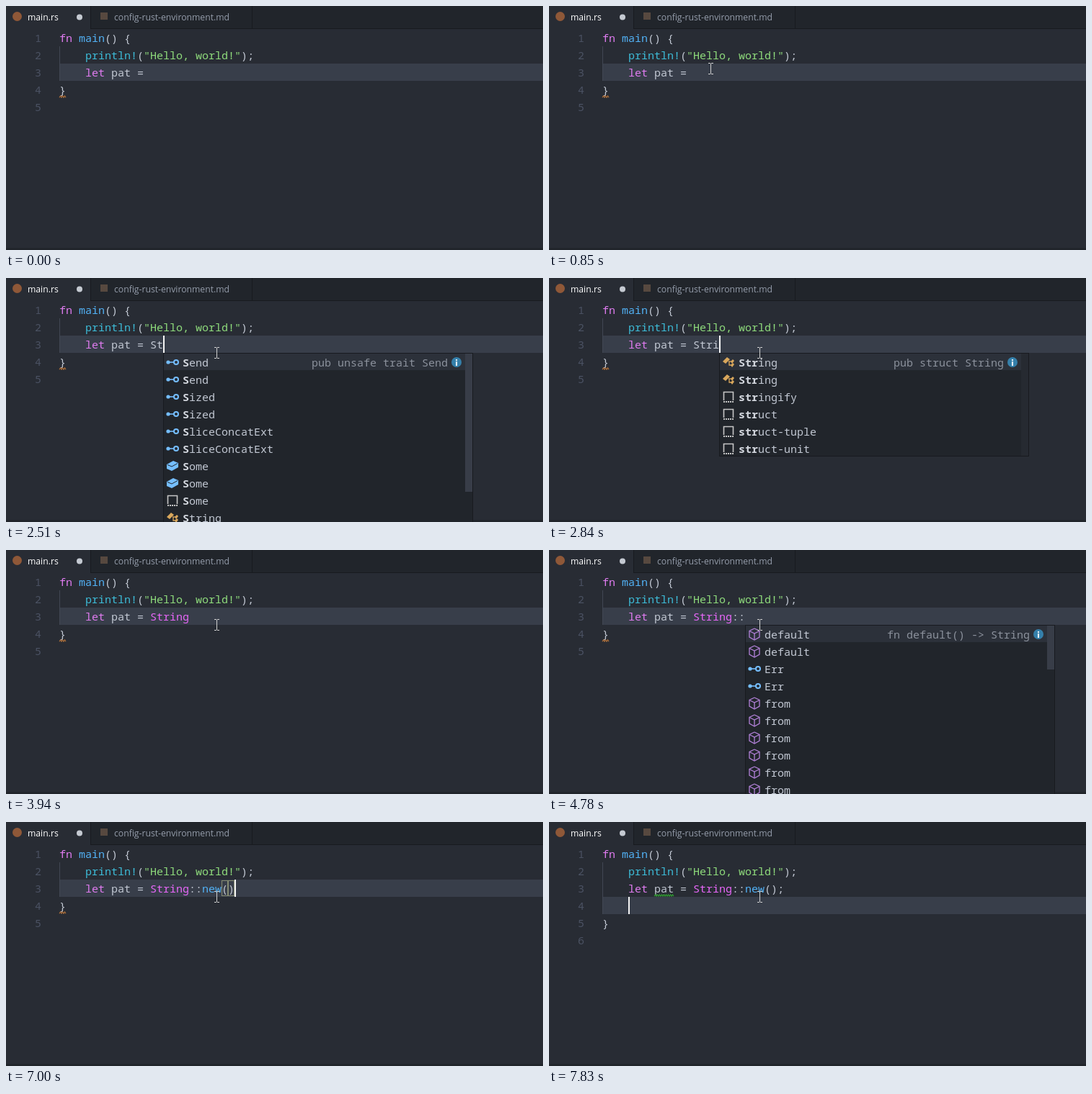
Animation, 745 px wide and 339 px high, one loop 8 s. Source, as an HTML page with a canvas:

```html
<!DOCTYPE html>
<html>
<head>
<meta charset="utf-8">
<style>
html, body { margin: 0; width: 100%; height: 100%; overflow: hidden; background: #282c34; }
canvas { display: block; }
</style>
</head>
<body>
<canvas id="stage" width="745" height="339"></canvas>
<script>
const ctx = document.getElementById('stage').getContext('2d', { alpha: false });
const LOOP = 8000, BLINK = 460, CHAR = 9, ROW = 24, CODE_X = 74, TYPE_X = 200;
const FAMILY = '15px "Noto Sans Mono", monospace';
const MONO = '500 ' + FAMILY, BOLD = '700 ' + FAMILY;
const C = {
  bg: '#282c34', panel: '#21252b', edge: '#181a1f', line: '#383e4a', number: '#4b5263',
  text: '#c2c8d3', keyword: '#e07cf0', func: '#52b2f6', macro: '#3dbcd8', string: '#8fdc7c',
  type: '#e767f8', detail: '#8b919c', blue: '#75beff', orange: '#d9a75c', purple: '#b180d7', grey: '#c5c5c5',
  thumb: '#383d48', faintThumb: '#262a31'
};

// Completion lists: each entry is "icon label".
const entries = list => list.split(',').map(entry => entry.split(' '));
const lists = {
  s: { detail: 'pub unsafe trait Send', thumb: 192, items: entries('trait Send,trait Send,trait Sized,trait Sized,trait SliceConcatExt,trait SliceConcatExt,variant Some,variant Some,snippet Some,struct String') },
  st: { detail: 'pub struct String', thumb: 192, items: entries('struct String,struct String,snippet static,snippet stringify,snippet struct,snippet struct-tuple,snippet struct-unit,trait SliceConcatExt,trait SliceConcatExt,snippet assert') },
  str: { detail: 'pub struct String', thumb: 142, fading: true, items: entries('struct String,struct String,snippet stringify,snippet struct,snippet struct-tuple,snippet struct-unit') },
  stri: { detail: 'pub struct String', items: entries('struct String,struct String,snippet stringify,snippet struct-unit') },
  '': { detail: 'fn default() -> String', thumb: 61, items: entries('fn default,fn default,trait Err,trait Err,fn from,fn from,fn from,fn from,fn from,fn from') },
  n: { detail: 'fn new() -> String', items: entries('fn new,fn new') }
};

// t: start, typed: text after "let pat = ", menu: list key, blink: when the caret last turned on
const steps = [
  { t: 0, typed: '', blink: 390 },
  { t: 1770, typed: 'S' },
  { t: 1820, typed: 'S', menu: 's', opens: true, blink: 1770 },
  { t: 2510, typed: 'St', menu: 's' },
  { t: 2560, typed: 'St', menu: 'st' },
  { t: 2690, typed: 'Str', menu: 'st' },
  { t: 2740, typed: 'Str', menu: 'str' },
  { t: 2840, typed: 'Stri', menu: 'str' },
  { t: 2870, typed: 'Stri', menu: 'stri', blink: 2840 },
  { t: 3480, typed: 'String' },
  { t: 4170, typed: 'String:' },
  { t: 4320, typed: 'String::' },
  { t: 4500, typed: 'String::', menu: '', opens: true, blink: 4320 },
  { t: 5190, typed: 'String::n', menu: '' },
  { t: 5240, typed: 'String::n', menu: 'n' },
  { t: 5830, typed: 'String::new' },
  { t: 6670, typed: 'String::new()', caret: 12, brackets: true },
  { t: 7000, typed: 'String::new()', brackets: true },
  { t: 7650, typed: 'String::new();' },
  { t: 7740, typed: 'String::new();', newline: true },
  { t: 7830, typed: 'String::new();', newline: true, unused: true }
];

function rect(x, y, w, h, color) {
  ctx.fillStyle = color;
  ctx.fillRect(x, y, w, h);
}

function disc(x, y, r, color) {
  ctx.fillStyle = color;
  ctx.beginPath();
  ctx.arc(x, y, r, 0, 7);
  ctx.fill();
}

function text(str, x, y, color, font = MONO) {
  ctx.font = font;
  ctx.fillStyle = color;
  ctx.fillText(str, x, y);
}

// Draws [text, color] runs on the character grid.
function runs(parts, x, y) {
  for (const [str, color] of parts) {
    text(str, x, y, color);
    x += str.length * CHAR;
  }
}

function path(points, color, width = 1.3) {
  ctx.strokeStyle = color;
  ctx.lineWidth = width;
  ctx.beginPath();
  points.forEach(([x, y]) => ctx.lineTo(x, y));
  ctx.stroke();
}

function polygon(points, color) {
  ctx.fillStyle = color;
  ctx.beginPath();
  points.forEach(([x, y]) => ctx.lineTo(x, y));
  ctx.fill();
}

function squiggle(x, y, w, color) {
  const points = [];
  for (let i = 0; i <= w; i += 1.5) points.push([x + i, y + (i / 1.5 % 2 ? -1.2 : 1.2)]);
  path(points, color, 1.1);
}

// Icons are drawn around the origin.
const icons = {
  trait() {
    disc(-6, 0, 2.6, C.blue);
    path([[-6, 0], [2, 0]], C.blue, 1.6);
    ctx.lineWidth = 2;
    ctx.beginPath();
    ctx.arc(5, 0, 3, 0, 7);
    ctx.stroke();
  },
  variant() {
    polygon([[-8, -2], [1, -7], [8, -4], [8, 2], [-1, 7], [-8, 4]], C.blue);
    path([[-7, -1.5], [-1, 1], [7, -3.5]], C.panel, 1);
  },
  snippet() {
    path([[-6.5, 5], [-6.5, -6.5], [6.5, -6.5], [6.5, 5]], C.grey, 1.6);
    for (let i = -7; i <= 6; i += 3) rect(i, 6, 2, 2, C.grey);
  },
  struct() {
    polygon([[-8, -1], [-2, -7], [2, -4], [-4, 2]], C.orange);
    path([[0, -1], [5, -1]], C.orange);
    path([[1, -1], [1, 4], [5, 4]], C.orange);
    for (const y of [-1, 4]) polygon([[3, y], [6, y - 3], [8, y - 1], [5, y + 3]], C.orange);
  },
  fn() {
    path([[0, -8], [7, -4.5], [7, 4], [0, 8], [-7, 4], [-7, -4.5], [0, -8]], C.purple);
    path([[-7, -4.5], [0, -1], [7, -4.5]], C.purple);
    path([[0, -1], [0, 8]], C.purple);
  }
};

function drawIcon(name, x, y) {
  ctx.save();
  ctx.translate(x, y);
  icons[name]();
  ctx.restore();
}

function drawTabs() {
  rect(0, 0, 745, 32, C.panel);
  rect(0, 31, 745, 1, C.edge);
  rect(0, 0, 117, 32, C.bg);
  rect(117, 0, 1, 32, C.edge);
  rect(341, 0, 1, 32, C.edge);
  disc(15.5, 14.5, 6.5, '#8f5838');
  rect(131, 9, 10, 10, '#57493f');
  const font = '500 12.2px "Open Sans", sans-serif';
  text('main.rs', 30, 20, '#fff', font);
  text('config-rust-environment.md', 150, 20, '#959dab', font);
  disc(102, 15.5, 4, '#c5cad2');
}

function typedRuns(typed) {
  const name = typed.slice(0, 6), call = typed.slice(8);
  return [
    [name, name === 'String' ? C.type : C.text],
    [typed.slice(6, 8), C.text],
    [call.slice(0, 3), call.length > 3 ? C.func : C.text],
    [call.slice(3), C.text]
  ];
}

function drawCode(step, caretOn) {
  const activeRow = step.newline ? 3 : 2, lastRow = activeRow + 1;
  const baseline = row => 50 + row * ROW;
  rect(CODE_X, 32 + activeRow * ROW, 745 - CODE_X, ROW, C.line);
  rect(CODE_X, 56, 1, (lastRow - 1) * ROW, '#424753');
  for (let row = 0; row <= lastRow + 1; row++) text(String(row + 1), 40, baseline(row), C.number);

  runs([['fn', C.keyword], [' main', C.func], ['() {', C.text]], CODE_X, baseline(0));
  runs([['println!', C.macro], ['(', C.text], ['"Hello, world!"', C.string], [');', C.text]], 110, baseline(1));
  runs([['let', C.keyword], [' pat = ', C.text], ...typedRuns(step.typed)], 110, baseline(2));
  text('}', CODE_X, baseline(lastRow), C.text);

  if (!step.newline) squiggle(CODE_X, 126, 9, '#b8743a');
  if (step.unused) squiggle(146, 102, 27, '#2fa52f');
  if (step.brackets) {
    ctx.strokeStyle = '#858b72';
    ctx.lineWidth = 1;
    for (const x of [299, 308]) ctx.strokeRect(x + .5, 81.5, 8, 21);
  }
  const caretX = step.newline ? 110 : TYPE_X + (step.caret ?? step.typed.length) * CHAR;
  if (caretOn) rect(caretX, 32 + activeRow * ROW, 2, ROW, '#f4f4f4');
}

function drawMenu(key, x, opening) {
  const { items, detail, thumb, fading } = lists[key], top = 104;
  const height = items.length * ROW;
  rect(x, top, 430, height, C.edge);
  rect(x + 1, top + 1, 428, height - 2, C.panel);
  rect(x + 1, top + 1, 428, ROW - 1, '#2c313a');
  if (thumb) rect(x + 419, top + 1, 10, thumb, opening || fading ? C.faintThumb : C.thumb);

  items.forEach(([icon, label], i) => {
    const y = top + 13 + i * ROW;
    drawIcon(icon, x + 13, y);
    let matched = 0;
    [...label].forEach((char, n) => {
      const hit = char.toLowerCase() === key[matched];
      if (hit) matched++;
      text(char, x + 27 + n * CHAR, y + 6, hit ? '#d4d8df' : C.text, hit ? BOLD : MONO);
    });
  });

  text(detail, x + 395 - detail.length * CHAR, top + 19, C.detail);
  disc(x + 407, top + 13, 7, '#3580ab');
  rect(x + 406, top + 9, 2, 2, '#fff');
  rect(x + 406, top + 12, 2, 6, '#fff');
}

function pointerAt(t) {
  const ease = (from, to) => {
    const p = Math.min(1, Math.max(0, (t - from) / (to - from)));
    return p * p * (3 - 2 * p);
  };
  const enter = ease(20, 850), settle = ease(990, 1160);
  return [482 - 258 * enter + 68 * settle, 289 - 202 * enter + 17 * settle].map(Math.round);
}

function drawPointer(x, y) {
  rect(x, y - 7, 1, 14, '#d0d0d0');
  for (const end of [-8, 7]) {
    rect(x - 3, y + end, 3, 1, '#d0d0d0');
    rect(x + 1, y + end, 3, 1, '#d0d0d0');
  }
}

function draw(t) {
  const step = steps.findLast(s => s.t <= t);
  const caretOn = Math.floor((t - (step.blink ?? step.t)) / BLINK) % 2 === 0;
  const opening = step.opens && t < step.t + 80;
  rect(0, 0, 745, 339, C.bg);
  drawTabs();
  rect(0, 336, 745, 3, C.panel);
  drawCode(step, caretOn);
  if (step.menu !== undefined) drawMenu(step.menu, TYPE_X + step.typed.length * CHAR, opening);
  if (t >= 60) drawPointer(...pointerAt(t));
}

const start = performance.now();
function tick() {
  draw((performance.now() - start) % LOOP);
  requestAnimationFrame(tick);
}
tick();
</script>
</body>
</html>
```
